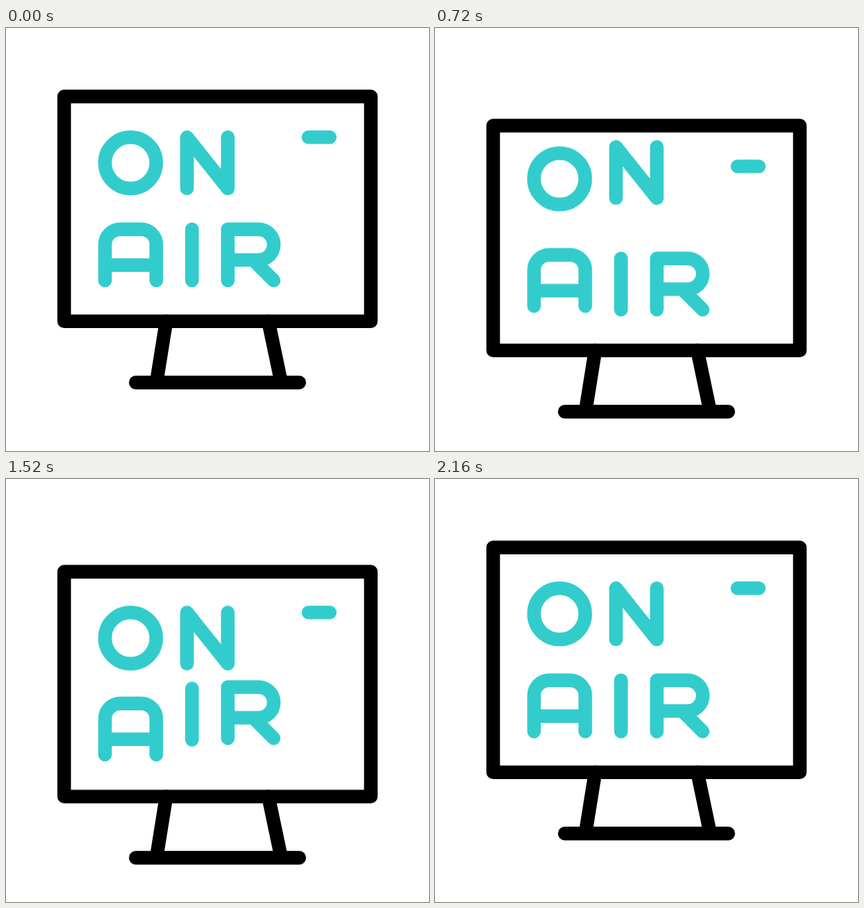
An HTML page without scripts for the animation above (2240 ms loop, 640 by 640 pixels).

```html
<!DOCTYPE html>
<html lang="en">
<head>
<meta charset="utf-8">
<title>On air</title>
<style>
  html, body { margin: 0; width: 100%; height: 100%; overflow: hidden; background: #fff; }
  svg { display: block; width: 100%; height: 100%; }
  g, path, circle {
    fill: none;
    stroke-width: 20.6px;
    stroke-linecap: round;
    stroke-linejoin: round;
  }
  .stand { stroke: #000; }
  .sign { stroke: #3cc; }

  .screen { animation: sink 2240ms infinite; }
  .letter { animation: hop 2240ms infinite backwards; }
  .o { animation-delay: -8ms; }
  .n { animation-delay: 247ms; }
  .a { animation-delay: 567ms; }
  .i { animation-delay: 843ms; }
  .r { animation-delay: 1126ms; }

  @keyframes sink {
    0% { transform: translateY(0); }
    1.786% { transform: translateY(0); animation-timing-function: cubic-bezier(.6, 0, .4, 1); }
    48.214% { transform: translateY(54px); animation-timing-function: cubic-bezier(.6, 0, .4, 1); }
    94.643%, 100% { transform: translateY(0); }
  }
  @keyframes hop {
    0% { transform: translateY(0); animation-timing-function: ease-in-out; }
    23.214% { transform: translateY(-30px); animation-timing-function: ease-in-out; }
    46.429%, 100% { transform: translateY(0); }
  }
</style>
</head>
<body>
<svg viewBox="0 0 640 640" role="img" aria-label="On air">
  <g class="screen">
    <g class="stand">
      <path d="M88 103.6H552V443.8H88Z"/>
      <path d="M242.4 443.8L227.6 536.4M397 443.8L415.3 531M196.3 536.4H443.7"/>
    </g>
    <g class="sign">
      <path d="M457.6 165.3H490"/>
      <circle class="letter o" cx="188.5" cy="204" r="38.8"/>
      <path class="letter n" d="M273.8 242.7V165.3L335.6 242.7V165.3"/>
      <path class="letter a" d="M149.8 382V327.6a23 23 0 0 1 23-23H204.4a23 23 0 0 1 23 23V382M149.8 358.7H227.4"/>
      <path class="letter i" d="M281.4 304.6V382"/>
      <path class="letter r" d="M335.6 382V304.6H382a23.2 23.2 0 0 1 0 46.4H335.6M374 351L405 382"/>
    </g>
  </g>
</svg>
</body>
</html>
```
